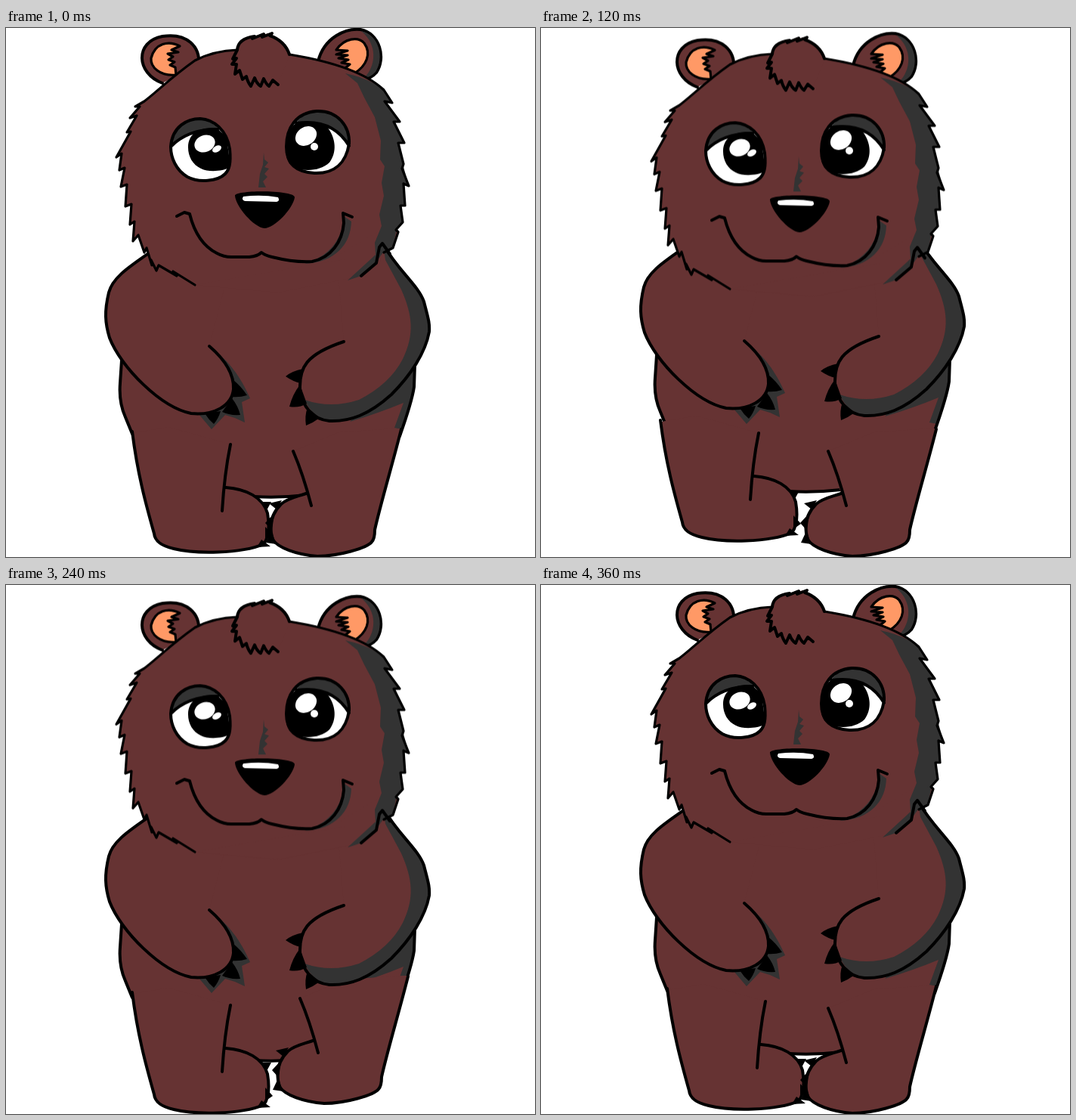
Animation of 700 by 700 pixels, one loop 0.4 s. Source, as an HTML page:

```html
<!DOCTYPE html>
<html lang="en">
<head>
<meta charset="utf-8">
<title>Dancing bear</title>
<style>
  html, body { margin: 0; width: 100%; height: 100%; overflow: hidden; background: #fff; }
  svg { display: block; width: 100vw; height: 100vh; }

  .fur { fill: #633; }
  .shade { fill: #333; }
  .ear { fill: #f96; }
  .white { fill: #fff; }
  .line { fill: none; }
  .ink { stroke: #000; stroke-width: 4; stroke-linecap: round; stroke-linejoin: round; }
  .thin { stroke-width: 3.2; }

  /* Each segment advances in 40 ms steps */
  .body, .head, .left, .right { animation: 400ms steps(3) infinite; }
  .body { animation-name: body; }
  .head { animation-name: head; }
  .left { animation-name: left; }
  .right { animation-name: right; }

  @keyframes body {
    0%, 90%, 100% { transform: translate(0, 0); }
    30% { transform: translate(0, -7px); }
    60% { transform: translate(0, 9px); }
  }
  @keyframes head {
    0%, 90%, 100% { transform: translate(0, 0); }
    10% { transform: translate(0, 0); animation-timing-function: steps(5); }
    60% { transform: translate(0, 13.3px); }
  }
  @keyframes left {
    0%, 90%, 100% { transform: translate(0, 0); }
    30% { transform: translate(-9px, -15px); }
    60% { transform: translate(0, 5px); }
  }
  @keyframes right {
    0%, 30%, 90%, 100% { transform: translate(0, 0); }
    60% { transform: translate(9px, -13px); }
  }
</style>
</head>
<body>
<svg viewBox="0 0 700 700">
  <defs>
    <path id="rim" d="M250 340L221 322L226 328L202 314L199 321L192 307L193 314L186 291L183 297L175 274L168 282L170 256L164 260L166 233L158 236L160 207L152 210L157 185L150 188L153 166L146 171L165 137L160 138L173 116L164 119L177 104L171 104L183 97C200 84 220 64 250 43Q275 30 306 29L375 35C430 44 475 58 500 82L511 99L501 97L521 124L513 124L527 152L519 152L526 180L524 186L533 209L526 206L528 235L522 235L525 257L516 267L519 270L512 291L500 297"/>
  </defs>

  <!-- torso -->
  <g class="body">
    <path class="fur" d="M190 300L500 300L541 440L540 475Q537 495 522 540L500 560L397 618Q362 622 328 620L290 608L185 560L167 537L158 515Q149 495 151 470L153 440Z"/>
    <path class="shade" d="M455 521L500 470L541 440L540 475Q537 500 524 531L514 529L526 496Q492 510 455 521Z"/>
    <path class="ink line" d="M153 440L151 470Q149 495 158 515L167 537M541 445L540 475Q537 495 521 540M328 620Q362 622 397 618"/>
  </g>

  <!-- legs -->
  <g class="left">
    <path class="fur" d="M168 536L215 528L297 551L291 608C318 610 340 621 346 642C349 660 347 675 341 683C310 696 250 696 222 689C205 685 197 679 196 669C185 630 174 590 168 536Z"/>
    <path class="ink line" d="M167 534C174 590 185 630 196 669C197 679 205 685 222 689C250 696 310 696 341 683C347 675 349 660 346 642C340 621 318 610 291 608M297 551Q289 590 286 639"/>
    <path d="M336 627L351 627L345 638ZM343 660L353 671L343 678ZM338 677L350 686L332 687Z"/>
  </g>
  <g class="right">
    <path class="fur" d="M380 560L440 535L515 530L524 530C512 575 495 632 488 664Q488 676 484 680C478 688 440 699 412 699C385 697 360 688 353 677C347 658 352 642 364 630C373 622 386 620 397 616Z"/>
    <path class="ink line" d="M523 531C512 575 495 632 488 664Q488 676 484 680C478 688 440 699 412 699C385 697 360 688 353 677C347 658 352 642 364 630C373 622 386 620 397 616M380 560Q393 590 404 632"/>
    <path d="M365 625L348 629L358 637ZM355 642L343 655L352 665ZM351 666L344 681L358 683Z"/>
  </g>

  <!-- arms -->
  <g class="body">
    <path class="shade" d="M269 421C296 441 310 461 323 490L312 495L316 522L303 516L290 512L272 531L255 511L290 480Z"/>
    <path class="fur" d="M200 290C170 312 142 327 136 350C130 375 131 390 137 410C152 449 205 502 245 510C275 513 299 500 301 478C302 458 291 440 269 421L290 340Z"/>
    <path class="ink line" d="M200 290C170 312 142 327 136 350C130 375 131 390 137 410C152 449 205 502 245 510C275 513 299 500 301 478C302 458 291 440 269 421"/>
    <path d="M301 466Q311 474 319 486Q309 489 299 488ZM299 490Q307 500 310 512Q296 513 286 508ZM263 510Q268 518 275 524Q281 517 284 507Z"/>

    <path class="fur" d="M500 288C520 322 545 340 553 362C558 382 561 390 560 402C555 430 535 460 510 485C480 512 455 521 428 520C405 518 392 500 389 478C388 450 396 432 447 415L440 330Z"/>
    <path class="shade" d="M499 287C520 322 545 340 553 362C558 382 561 390 560 402C555 430 535 460 510 485C480 512 455 521 428 520Q405 515 395 492Q430 504 467 492Q508 471 525 438C541 405 538 380 523 346L502 307Z"/>
    <path class="ink line" d="M500 288C520 322 545 340 553 362C558 382 561 390 560 402C555 430 535 460 510 485C480 512 455 521 428 520C405 518 392 500 389 478C388 450 396 432 447 415"/>
    <path d="M393 451Q378 454 370 461Q380 468 390 470ZM389 472Q379 485 375 501Q388 503 398 497ZM399 502Q395 513 397 526Q407 522 415 516Z"/>
  </g>

  <g class="head">
    <!-- ears -->
    <path class="fur ink" d="M207 73C172 60 170 18 207 11C240 6 257 25 255 48"/>
    <path class="ear ink thin" d="M230 24C215 16 197 20 192 40C191 52 204 64 225 62L224 52L217 49L223 45L215 42L221 38L214 34L228 32L219 29Z"/>
    <path class="fur ink" d="M413 44C421 12 450 0 469 2C495 7 503 40 490 59Q483 67 474 67"/>
    <path class="shade" d="M470 4C494 9 501 40 489 58Q483 65 474 66C490 50 492 22 470 4Z"/>
    <path class="ear ink thin" d="M437 29C448 13 466 11 474 20C484 34 477 50 461 60L449 53L455 48L444 46L453 42L440 40L452 36L437 35L452 30Z"/>

    <!-- face and fur -->
    <path class="fur" d="M250 340L300 260L450 260L470 328L360 350Z"/>
    <use class="fur" href="#rim"/>
    <path class="fur" d="M494 292L470 328L440 300L490 270Z"/>
    <path class="shade" d="M449 60C476 66 490 74 500 82L510 98L501 97L521 123L513 124L527 151L519 152L525 180L533 209L526 207L528 234L522 236L525 258L517 266L512 290L499 297L491 308L470 328L452 334L489 300L488 284L497 262L494 247L500 222L497 205L501 183L495 174L496 149L488 118L474 92L465 73Z"/>
    <use class="ink line thin" href="#rim"/>
    <path class="ink line" d="M470 328L490 311L494 290L498 285L508 299"/>

    <path class="fur" d="M299 45L306 28Q309 15 325 13L347 7Q367 17 375 37L360 73L322 75L303 60Z"/>
    <path class="ink line" d="M375 35Q369 17 349 10L352 7L339 12L341 8L326 14L329 11Q307 14 306 29L300 41L305 40L299 48L305 48L303 61L309 56L313 68L318 64Q320 72 324 77L329 66Q332 74 337 77L341 67Q344 74 348 77L353 69L360 75"/>

    <!-- eyes -->
    <path class="white" d="M218 157C220 130 240 120 257 120C275 121 292 135 296 160C298 180 295 188 290 193C280 203 255 205 240 197C225 188 218 172 218 157Z"/>
    <path class="shade" d="M218 159C220 130 240 120 257 120Q270 121 282 134Q241 135 218 159Z"/>
    <path d="M241 158C241 139 256 131 279 132L292 145L297 184C286 190 268 191 258 186C247 181 241 170 241 158Z"/>
    <path class="ink line" d="M218 157C220 130 240 120 257 120C275 121 292 135 296 160C298 180 295 188 290 193C280 203 255 205 240 197C225 188 218 172 218 157Q240 134 280 134"/>
    <ellipse class="white" cx="263" cy="153" rx="14" ry="11" transform="rotate(-22 263 153)"/>
    <ellipse class="white" cx="279" cy="160" rx="6.5" ry="4" transform="rotate(-30 279 160)"/>

    <path class="white" d="M371 157C371 132 384 112 411 110C439 109 455 130 454 153C450 178 435 193 408 192C390 191 371 184 371 157Z"/>
    <path class="shade" d="M384 125C393 114 400 111 411 110C439 109 455 130 454 158Q435 120 384 125Z"/>
    <path d="M371 152C373 136 379 128 386 125Q413 121 425 131C437 146 438 165 428 178C415 190 394 190 380 184C371 178 369 166 371 152Z"/>
    <path class="ink line" d="M384 126Q432 119 454 156M371 157C371 132 384 112 411 110C439 109 455 130 454 153C450 178 435 193 408 192C390 191 371 184 371 157Z"/>
    <ellipse class="white" cx="397" cy="143" rx="15" ry="12" transform="rotate(-35 397 143)"/>
    <circle class="white" cx="408" cy="157" r="5"/>

    <!-- nose and mouth -->
    <path class="shade" d="M341 165L342 174L347 178L342 184L348 186L342 193L346 197L340 203L344 211L334 211L336 193L340 181Z"/>
    <path d="M303 222C302 214 382 214 382 224C380 239 355 265 342 265C328 264 304 236 303 222Z"/>
    <path class="white" d="M314 223Q338 220 360 224Q363 229 358 230L316 229Q311 227 314 223Z"/>
    <path class="shade" d="M447 249L457 256C456 286 436 310 395 312C432 301 446 275 447 249Z"/>
    <path class="ink line" d="M226 249L236 244L243 246C249 270 261 289 279 298Q288 303 298 303L322 303Q333 302 338 297Q343 301 352 303C376 309 390 310 405 309C430 304 445 283 447 258L446 245L458 250"/>
  </g>
</svg>
</body>
</html>
```
